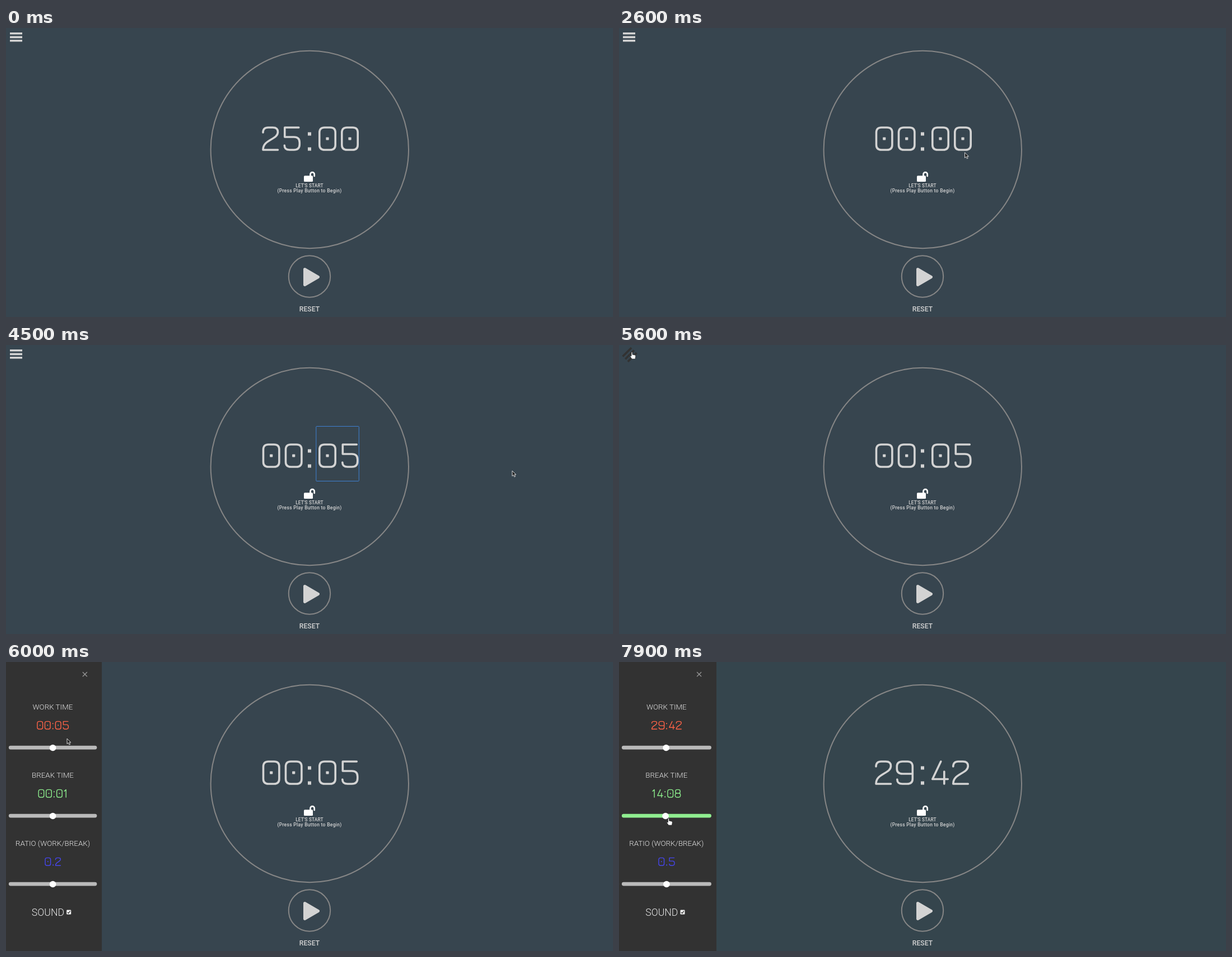
Animation of 1084x517 px, one loop 8 s. Source, as an HTML page:

```html
<!DOCTYPE html>
<html lang="en">
<head>
<meta charset="utf-8">
<title>Work timer</title>
<style>
html, body { margin: 0; width: 100%; height: 100%; overflow: hidden; background: #37454f; }
svg { display: block; width: 1084px; height: 517px; font-family: Roboto, sans-serif; fill: #d3d3d3; }
text { text-anchor: middle; }
.line { fill: none; stroke: #868686; stroke-width: 2; }
.digits { fill: none; stroke: #d3d3d3; stroke-width: 3.6; stroke-linecap: round; stroke-linejoin: round; }
.small { stroke-width: 4.2; }
.dot { stroke: none; }
.focus { fill: none; stroke: #3e80d2; }
.pick { fill: #0c6bde; }
.label { font-size: 13.4px; font-weight: 300; fill: #e6e6e6; }
.status { font-size: 8.3px; font-weight: 500; letter-spacing: .15px; }
.hint { font-size: 8.5px; letter-spacing: .3px; }
</style>
</head>
<body>
<svg viewBox="0 0 1084 517">
  <rect id="bg" width="1084" height="517"/>
  <path id="menu" d="M7 8h22v3.6H7zM7 14.6h22v3.6H7zM7 21h22v3.6H7z"/>
  <circle class="line" cx="542.3" cy="217.5" r="176.7"/>
  <g id="inputs"></g>
  <g id="min" class="digits" transform="translate(453.5 178)"></g>
  <g id="sec" class="digits" transform="translate(553.8 178)"></g>
  <path d="M539 186.5h6v6h-6zM539 213.5h6v6h-6z"/>
  <g fill="#fff">
    <rect x="532" y="264.3" width="16" height="10.7" rx="1.6"/>
    <path d="M543.5 265v-3.2a3.6 3.6 0 0 1 7.2 0v3.2" fill="none" stroke="#fff" stroke-width="2.7" stroke-linecap="round"/>
  </g>
  <text class="status" x="542" y="284.6">LET'S START</text>
  <text class="status hint" x="542" y="293.5">(Press Play Button to Begin)</text>
  <circle class="line" cx="542" cy="444.5" r="37.2"/>
  <path d="M533.5 431.5L557.5 445.5L533.5 459.5Z" stroke="#d3d3d3" stroke-width="5" stroke-linejoin="round"/>
  <text x="542" y="507" font-size="12.2" font-weight="500">RESET</text>
  <clipPath id="clip"><rect id="clipBox" height="517"/></clipPath>
  <g id="panel" clip-path="url(#clip)"></g>
  <g id="cursor"></g>
</svg>
<script>
const LOOP = 8000, STEP = 100, PANEL = 174;
const $ = id => document.getElementById(id);

// Each digit: advance width and stroke, 40 units tall.
const GLYPHS = {
  0: [40, 'M6 9q0-9 9-9h10.4q9 0 9 9v22q0 9-9 9H15q-9 0-9-9z'],
  1: [26, 'M6 8L15 0V40'],
  2: [36.8, 'M5.5 9q0-9 9-9h8.5q9 0 9 8c0 14-26.5 13-26.5 32H32'],
  3: [36.5, 'M9 7q0-7 8-7h10q6 0 6 9t-6 10h-9h9q7 0 7 10.5T27 40H17q-8 0-8-8'],
  4: [37.5, 'M21 0L6 31.5h27.5M27 18V40'],
  5: [39, 'M32.5 0H7.5V17h16.5q10 0 10 10v3q0 10-10 10h-8q-9 0-9-8'],
  6: [39, 'M33 8q0-8-9-8h-9q-9.5 0-9.5 9v22q0 9 9 9h9q10 0 10-9v-4q0-9-10-9H5.5'],
  7: [33, 'M7 7V0H34q0 8-7 16t-8 24'],
  8: [39, 'M14 19q-7 0-7-9.5T15 0h9q8 0 8 9.5T25 19H14q-8.5 0-8.5 10.5T15 40h9q9.5 0 9.5-10.5T25 19'],
  9: [39, 'M6.5 32q0 8 9 8h9q9.5 0 9.5-9V9q0-9-9-9h-9q-10 0-10 9v4q0 9 10 9H34'],
  ':': [16, ''],
  '.': [15, '']
};
const square = (x, y, s) => `<rect class="dot" x="${x - s / 2}" y="${y - s / 2}" width="${s}" height="${s}" rx=".8"/>`;

function digits(str, color) {
  let x = 0, out = '';
  for (const c of str) {
    const [w, d] = GLYPHS[c];
    if (d) out += `<path d="${d}" transform="translate(${x} 0)"/>`;
    out += `<g fill="${color}">`;
    if (c === '0') out += square(x + 20.2, 20, 5.2);
    if (c === ':') out += square(x + 8, 11, 5.5);
    if (c === ':' || c === '.') out += square(x + 8, 38, 5.5);
    out += '</g>';
    x += w;
  }
  return { out, width: x };
}

function show(id, str, color) {
  $(id).innerHTML = digits(str, color).out;
  $(id).style.stroke = color;
  $(id).setAttribute('aria-label', str);
}

// Linear keys: [time, value, value...]
function track(keys, t) {
  if (t <= keys[0][0]) return keys[0].slice(1);
  for (let i = 1; i < keys.length; i++) {
    const a = keys[i - 1], b = keys[i];
    if (t <= b[0]) {
      const p = (t - a[0]) / (b[0] - a[0]);
      return a.slice(1).map((v, j) => v + (b[j + 1] - v) * p);
    }
  }
  return keys[keys.length - 1].slice(1);
}

const POINTER = [
  [400, 340, 300], [700, 391, 215], [1100, 391, 215], [1400, 519, 215], [1600, 519, 215], [1700, 520, 216],
  [2300, 520, 216], [2700, 650, 225], [2900, 655, 222], [3100, 655, 200], [3500, 603, 194], [3700, 602, 193],
  [4200, 602, 193], [4500, 904, 225], [4600, 904, 225], [4900, 654, 180], [5000, 640, 170], [5400, 40, 30],
  [5600, 23, 13], [5800, 23, 13], [6000, 109, 137], [6200, 85, 154]
];
const WORK = [[6200, 1800], [6500, 2030], [6700, 2264], [6800, 2264], [7000, 2450], [7200, 2050], [7400, 1782]];

const pad = n => String(Math.floor(n)).padStart(2, '0');
const clock = s => [pad(s / 60), pad(s % 60)];

function values(t) {
  let work = t < 2100 ? ['25', '00'] : [t < 2200 ? '0' : '00', t < 4100 ? '00' : t < 4200 ? '0' : '05'];
  let rest = 1, workPos = .5, restPos = .5, ratio = '0.2';
  if (t >= 6300) {
    const s = track(WORK, t)[0];
    work = clock(s);
    workPos = s / 3600;
    ratio = '0.1';
  }
  if (t >= 7800) {
    rest = t < 7900 ? 870 : 848;
    restPos = rest / 1740;
    ratio = (rest / 1782).toFixed(1);
  }
  return { work, rest: clock(rest).join(':'), workPos, restPos, ratio };
}

function inputs(t) {
  const box = (x, on, picked) => on
    ? (picked ? `<rect class="pick" x="${x}" y="155.5" width="76.5" height="78"/>` : '') +
      `<rect class="focus" x="${x}" y="145.5" width="76.5" height="98" rx="1"/>` : '';
  return box(453.8, t >= 1400 && t < 2600, t < 2100) +
    box(553.8, t >= 3700 && t < 4700, t >= 3900 && t < 4100);
}

function block(w, y, name, value, color, pos, active) {
  const mid = w * .4875, left = w * .028, len = w * .92, k = .338;
  const d = digits(value, color);
  const thumb = left + 6 + Math.max(0, len - 12) * pos;
  return `<text class="label" x="${mid}" y="${y + 4.8}">${name}</text>
    <g class="digits small" style="stroke:${color}" aria-label="${value}"
      transform="translate(${mid - d.width * k / 2} ${y + 26.4}) scale(${k})">${d.out}</g>
    <rect x="${left}" y="${y + 69.7}" width="${len}" height="6.8" rx="3.4" fill="${active || '#bababa'}"/>
    <circle cx="${thumb}" cy="${y + 73.5}" r="5.8" fill="#fff"/>`;
}

function panel(t, v) {
  const p = Math.min(1, Math.max(0, (t - 5650) / 400));
  const w = PANEL * (1 - (1 - p) ** 2);
  $('clipBox').setAttribute('width', w);
  if (!w) return '';
  const workOn = t >= 6200 && t < 7500 && '#ff6f43';
  const restOn = t >= 7700 && '#90ee90';
  const mid = w * .4875, x = w * .8225;
  return `<rect width="${w}" height="517" fill="#323232"/>
    <path d="M${x - 4} 18l8 8m0-8l-8 8" stroke="#999" stroke-width="1.2"/>` +
    block(w, 80, 'WORK TIME', v.work.join(':'), '#ff6347', v.workPos, workOn) +
    block(w, 202, 'BREAK TIME', v.rest, '#8cec8c', v.restPos, restOn) +
    block(w, 324, 'RATIO (WORK/BREAK)', v.ratio, '#4545ee', .5) +
    `<text class="label" x="${mid - 8.5}" y="454" style="font-size:17.7px">SOUND</text>
    <rect x="${mid + 24.7}" y="443.5" width="8" height="8" rx="1.2" fill="#f2f2f2"/>
    <path d="M${mid + 26.3} 447.6l1.7 1.8 3.2-4" fill="none" stroke="#333" stroke-width="1.3"/>`;
}

const SHAPES = {
  arrow: '<path d="M0 0v9.5l2.2-2 1.7 3.5 1.7-.8-1.7-3.3h3z" fill="#222" stroke="#fff" stroke-width=".8"/>',
  beam: '<path d="M-2.5-5.5h5M0-5.5v11M-2.5 5.5h5" stroke="#eee" stroke-width="2"/>' +
    '<path d="M-2-5.5h4M0-5.5v11M-2 5.5h4" stroke="#333" stroke-width=".8"/>',
  hand: '<path d="M-1 0q1-1 2 0v4l4.5 1q1.5.4 1.3 2l-.8 5H0L-3 7.5q0-1.7 2-.5z" fill="#fff" stroke="#222" stroke-width=".7"/>'
};

function cursor(t) {
  if (t < 400) return '';
  const [x, y] = t <= 6200 ? track(POINTER, t)
    : t >= 7400 ? track([[7400, 85, 156], [7700, 88, 275], [7900, 88.5, 280]], t)
    : [11 + track(WORK, t)[0] / 3600 * 148, 156];
  const beam = t >= 1400 && t < 2500 || t >= 3400 && t < 4300;
  const hand = t >= 5500 && t < 5800 || t >= 6200 && t < 7500 || t >= 7700;
  return `<g transform="translate(${x} ${y})">${SHAPES[beam ? 'beam' : hand ? 'hand' : 'arrow']}</g>`;
}

function draw(t) {
  const v = values(t);
  const picked = t >= 1400 && t < 2100, pickedSec = t >= 3900 && t < 4100;
  $('bg').setAttribute('fill', t < 6100 ? '#37454f' : '#35454d');
  const turn = Math.min(1, Math.max(0, (t - 5400) / 200));
  $('menu').setAttribute('transform', `translate(${turn} ${turn}) rotate(${-45 * turn} 18 16.3)`);
  $('menu').setAttribute('fill', turn ? '#323232' : '#d3d3d3');
  $('inputs').innerHTML = inputs(t);
  show('min', v.work[0], picked ? '#fff' : '#d3d3d3');
  show('sec', v.work[1], pickedSec ? '#fff' : '#d3d3d3');
  $('panel').innerHTML = panel(t, v);
  $('cursor').innerHTML = cursor(t);
}

// The picture advances ten times a second.
const start = performance.now();
let last = -1;
function tick() {
  const t = Math.floor((performance.now() - start) % LOOP / STEP) * STEP;
  if (t !== last) draw(last = t);
  requestAnimationFrame(tick);
}
tick();
</script>
</body>
</html>
```
